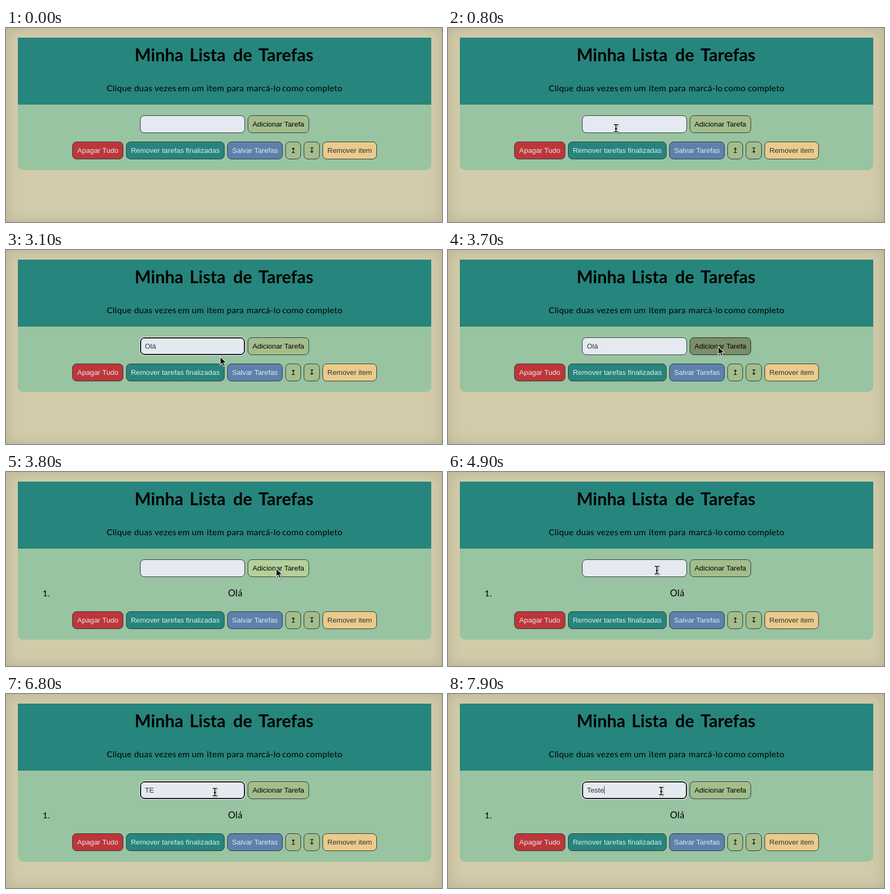
Recreate the animation shown at these times as an HTML page. Size 810 by 362 pixels, loop 8000 ms.

```html
<!DOCTYPE html>
<html lang="pt-BR">
<head>
<meta charset="utf-8">
<title>Minha Lista de Tarefas</title>
<style>
  html, body { margin: 0; width: 100%; height: 100%; overflow: hidden; }
  body { position: relative; background: #d2cba9; font: 13.333px "Liberation Sans", Arial, sans-serif; }
  body::before { content: ""; position: absolute; inset: 0; box-shadow: inset 0 0 26px rgba(0, 0, 0, .13); }
  header, main, .box, svg { position: absolute; box-sizing: border-box; }
  header { left: 22px; top: 18px; width: 768px; height: 125px; background: #26857c; }
  main { left: 22px; top: 143px; width: 768px; height: 122px; background: #98c4a1; border-radius: 0 0 10px 10px; }
  .box {
    left: var(--x); width: var(--w); top: 163px; height: 33px;
    display: flex; align-items: center; justify-content: center; white-space: pre;
    border: 1px solid #2e3440; border-radius: 8px; background: var(--bg); color: var(--ink, #e5e9f0);
  }
  .tools .box { top: 212px; }
  .arrow { font-family: "DejaVu Sans", sans-serif; }
  #field { justify-content: flex-start; padding-left: 8px; }
  #field.focus { border-color: #101010; box-shadow: inset 0 0 0 1px #101010, 0 0 0 1px #fff; }
  #caret { width: 1px; height: 15px; background: #2e3440; }
  .filled main { height: 170px; }
  .filled .tools .box { top: 260px; }
  svg { left: 0; top: 0; width: 810px; height: 362px; font-family: Lato, sans-serif; }
  #item { visibility: hidden; }
  .filled #item { visibility: visible; }
  .small { font-size: 16px; letter-spacing: .3px; }
  .cursor { filter: drop-shadow(1px 1px 1px rgba(0, 0, 0, .3)); }
</style>
</head>
<body>
<header></header>
<main></main>
<div class="box" id="field" style="--x:249px;--w:195px;--bg:#e5e9f0;--ink:#2e3440"><span id="typed"></span><i id="caret"></i></div>
<div class="box" id="add" style="--x:449px;--w:114px;--bg:#a3be8c;--ink:#000">Adicionar Tarefa</div>
<div class="tools">
  <div class="box" style="--x:123px;--w:95px;--bg:#bd3639">Apagar Tudo</div>
  <div class="box" style="--x:223px;--w:183px;--bg:#26857c">Remover tarefas finalizadas</div>
  <div class="box" style="--x:411px;--w:103px;--bg:#5e81ac">Salvar Tarefas</div>
  <div class="box arrow" style="--x:519px;--w:29px;--bg:#a3be8c;--ink:#000">↥</div>
  <div class="box arrow" style="--x:553px;--w:30px;--bg:#a3be8c;--ink:#000">↧</div>
  <div class="box" style="--x:588px;--w:101px;--bg:#ebcb8b;--ink:#2e3440">Remover item</div>
</div>
<svg viewBox="0 0 810 362">
  <text y="62" font-size="32" font-weight="700"><tspan x="239">Minha</tspan> <tspan x="341">Lista</tspan> <tspan x="422">de</tspan> <tspan x="469">Tarefas</tspan></text>
  <text y="118" class="small"><tspan x="187">Clique</tspan> <tspan x="238">duas</tspan> <tspan x="276">vezes</tspan> <tspan x="319">em</tspan> <tspan x="345">um</tspan> <tspan x="373">item</tspan> <tspan x="410">para</tspan> <tspan x="447">marcá-lo</tspan> <tspan x="513">como</tspan> <tspan x="557">completo</tspan></text>
  <g id="item" class="small">
    <text x="68" y="232">1.</text>
    <text x="426" y="232" text-anchor="middle" font-size="17">Olá</text>
  </g>
  <g id="pointer" class="cursor">
    <path d="M0 0V15.5L3.6 12.2L6.2 18.3L9 17.1L6.4 11.2H11.2Z" stroke="#fff" stroke-width="1.1"/>
  </g>
  <g id="beam" class="cursor" fill="none">
    <path id="bar" d="M-4 -7H-1.2L0 -6L1.2 -7H4M0 -6V6M-4 7H-1.2L0 6L1.2 7H4M-2 1H2" stroke="#fff" stroke-width="3.4"/>
    <use href="#bar" style="stroke:#000"/>
    <path d="M-4 -7H-1.2L0 -6L1.2 -7H4M0 -6V6M-4 7H-1.2L0 6L1.2 7H4M-2 1H2" stroke="#000" stroke-width="1.6"/>
  </g>
</svg>
<script>
  const LOOP = 8000;
  const $ = id => document.getElementById(id);

  // [time, x, y, shape]
  const moves = [
    [0, 0, 0, ""],
    [500, 205, 190, "pointer"], [600, 232, 189, "pointer"],
    [700, 282, 188, "beam"], [800, 312, 187, "beam"],
    [1200, 322, 205, "pointer"],
    [3000, 340, 204, "pointer"], [3100, 398, 199, "pointer"], [3200, 455, 190, "pointer"],
    [3300, 490, 183, "pointer"], [3400, 502, 180, "pointer"],
    [4100, 499, 189, "pointer"], [4200, 485, 208, "pointer"], [4300, 462, 224, "pointer"],
    [4400, 440, 231, "pointer"], [4500, 423, 233, "pointer"],
    [4800, 405, 210, "pointer"], [4900, 388, 183, "beam"],
    [7900, 396, 181, "beam"]
  ];
  // [time, text, caret shown]
  const typing = [
    [0, "", 0], [1000, "", 1], [1600, "", 0], [2000, "O", 1], [2200, "Ol", 1],
    [2300, "Ol´", 1], [2400, "Olá", 1], [3000, "Olá", 0], [3800, "", 0],
    [5000, "", 1], [5600, "", 0], [5800, "T", 1], [5900, "TE", 1], [6200, "TEs", 1],
    [6800, "TE", 0], [7000, "T", 0], [7200, "Tes", 1], [7500, "Teste", 1]
  ];
  const brightness = [[0, 1], [3200, 1.1], [3600, .75], [3800, 1.1], [4200, 1]];

  const at = (steps, t) => steps.findLast(step => step[0] <= t);

  function draw(t) {
    const [, x, y, shape] = at(moves, t);
    for (const id of ["pointer", "beam"]) {
      $(id).style.display = id === shape ? "" : "none";
      $(id).setAttribute("transform", `translate(${x} ${y})`);
    }
    const [, text, caret] = at(typing, t);
    $("typed").textContent = text;
    $("caret").style.visibility = caret ? "visible" : "hidden";
    $("field").classList.toggle("focus", (t >= 1000 && t < 3600) || t >= 5000);
    const light = at(brightness, t)[1];
    $("add").style.filter = light === 1 ? "" : `brightness(${light})`;
    document.body.classList.toggle("filled", t >= 3800);
  }

  const start = performance.now();
  function tick() {
    draw((performance.now() - start) % LOOP);
    requestAnimationFrame(tick);
  }
  tick();
</script>
</body>
</html>
```
